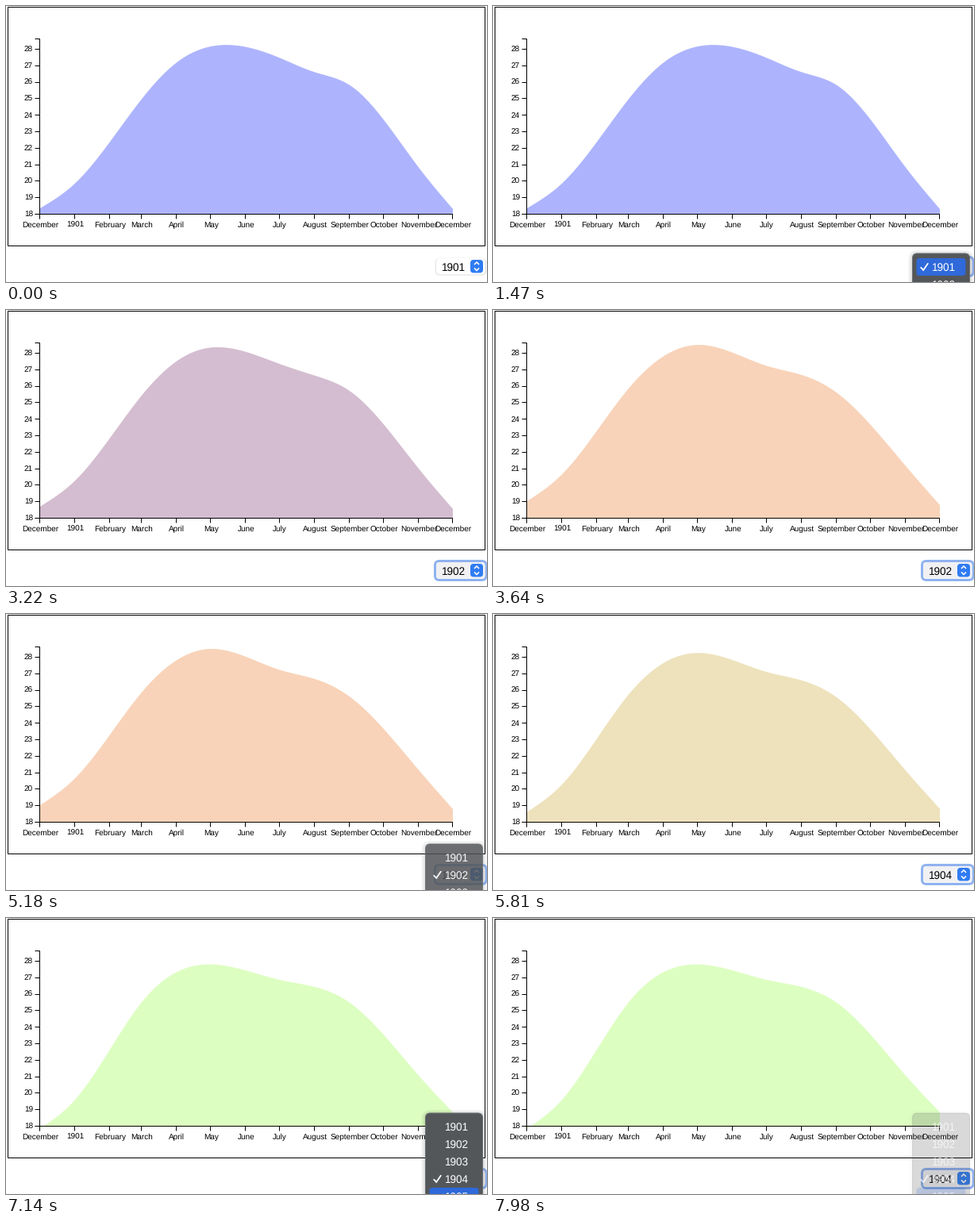
A matplotlib script for the animation above (8 s loop, 606x348 px).

```python
import numpy as np
import matplotlib.pyplot as plt
from matplotlib.animation import FuncAnimation
from matplotlib.colors import to_rgb
from matplotlib.patches import FancyBboxPatch

W, H, DPI = 606, 348, 100
LOOP, STEP = 8000, 20
PX = 72 / DPI  # points per pixel

plt.rcParams["font.family"] = "Liberation Sans"
plt.rcParams["text.hinting"] = "none"
fig = plt.figure(figsize=(W / DPI, H / DPI), dpi=DPI, facecolor="white")
ax = fig.add_axes([0, 0, 1, 1])
ax.set_xlim(0, W)
ax.set_ylim(H, 0)
ax.axis("off")


def line(xs, ys, color="black", width=1, z=3, cap="butt"):
    return ax.plot(xs, ys, color=color, lw=width * PX, zorder=z, snap=False,
                   solid_capstyle=cap, solid_joinstyle="miter")[0]


def label(x, y, text, size, color="black", ha="center", z=4):
    """Text whose digits are centred on y."""
    return ax.text(x, y + 0.36 * size, text, fontsize=size * PX, color=color,
                   ha=ha, va="baseline", zorder=z)


def rounded(x, y, w, h, r, face, edge="none", width=1, z=5, alpha=None):
    style = f"round,pad=0,rounding_size={r}"
    box = FancyBboxPatch((x, y), w, h, boxstyle=style, facecolor=face,
                         edgecolor=edge, lw=width * PX, zorder=z, alpha=alpha)
    return ax.add_patch(box)


def ease(u):
    u = min(max(u, 0), 1)
    return 4 * u**3 if u < 0.5 else 1 - 4 * (1 - u)**3


# ---- chart ----
LEFT, RIGHT, TOP, BASE, DEGREE = 43, 563, 42, 262, 20.8
MONTHS = ("December 1901 February March April May June July August "
          "September October November December").split()
lengths = [28 if m == 2 else 30 + (m + m // 8) % 2 for m in range(1, 13)]
days = np.cumsum([0, 31] + lengths[:11])
TICKS = LEFT + (RIGHT - LEFT) * days / days[-1]
XS = np.linspace(LEFT, RIGHT, 261)
# the spline fills in February, June and October
KNOTS = np.delete(TICKS, [2, 6, 10])


def spline(heights):
    """Natural cubic spline through a few key heights."""
    x, y = KNOTS, np.array(heights, float)
    h, n = np.diff(x), len(x)
    slope = np.diff(y) / h
    a, b = np.eye(n), np.zeros(n)
    for i in range(1, n - 1):
        a[i, i - 1:i + 2] = h[i - 1], 2 * (h[i - 1] + h[i]), h[i]
        b[i] = 6 * (slope[i] - slope[i - 1])
    m = np.linalg.solve(a, b)
    k = np.clip(np.searchsorted(x, XS, side="right") - 1, 0, n - 2)
    p, q, s = XS - x[k], x[k + 1] - XS, h[k]
    return ((m[k] * q**3 + m[k + 1] * p**3) / (6 * s)
            + (y[k] / s - m[k] * s / 6) * q
            + (y[k + 1] / s - m[k + 1] * s / 6) * p)


YEARS = ["1901", "1902", "1904"]
CURVES = [
    spline([255, 223.5, 117, 71, 51, 65.5, 83.5, 100, 204, 256]),
    spline([241, 207, 98.5, 58, 44, 70.5, 82, 104.5, 197, 246]),
    spline([265.5, 229, 106, 68, 58.5, 78, 87, 107, 199, 245]),
]
FILL_AT = [0, 0.5, 1, 2]
FILLS = np.array([to_rgb(c) for c in ("#adb4fd", "#d3bcd1", "#f8d3b9", "#ddfec1")])
MORPH = 1000

area = ax.fill(np.r_[XS, RIGHT, LEFT], np.r_[CURVES[0], BASE, BASE],
               color=FILLS[0], lw=0, zorder=1)[0]

line([2.5, 603.5, 603.5, 2.5, 2.5], [1.5, 1.5, 302.5, 302.5, 1.5], cap="projecting")
X0, X1, Y0, Y1 = LEFT - 0.5, RIGHT - 0.5, TOP - 0.5, BASE + 0.5
line([X0 - 6, X0, X0, X0 - 6], [Y0, Y0, Y1, Y1])
line([X0, X0, X1, X1], [Y1 + 6, Y1, Y1, Y1 + 6])
for value in range(18, 29):
    y = BASE - DEGREE * (value - 18)
    line([X0 - 6, X0], [round(y) + 0.5] * 2)
    label(LEFT - 9, y, str(value), 10, ha="right")
for x, month in zip(TICKS, MONTHS):
    line([round(x) - 0.5] * 2, [Y1, Y1 + 6])
    label(x, 275, month, 10)

# ---- select box ----
ROW_Y, ROW_H, YEAR_SIZE = 329, 22, 13.5
halo = [rounded(541.5 - g, 318.5 - g, 63 + 2 * g, 20.5 + 2 * g, 5 + g, "black",
                alpha=0.05) for g in (0.5, 1)]
ring = rounded(540.5, 316.5, 64.5, 24, 5.5, "white", "#8fb2f0", 3, z=5.1)
field = rounded(542, 318, 61.5, 20.5, 4.5, "white", z=5.2)
picked = label(549, ROW_Y, YEARS[0], YEAR_SIZE, ha="left", z=6)
rounded(585, 320, 16, 16.5, 4, "#2f7cf2", z=6)
for y, d in ((326, -3), (330.5, 3)):
    line([590, 593, 596], [y, y + d, y], "white", 1.6, z=6.1)

# ---- popup menu ----
# current row, chosen row, then times: opens, pointer moves, closed
MENUS = [(0, 1, 1400, 1820, 2715), (1, 3, 4130, 4340, 5355), (3, 4, 6580, 7000, 8020)]
FADE, PICK, BLINK, HOVER = 210, 390, 140, 210
ITEMS = 6
MX, MW, MH = 528.5, 72, ITEMS * ROW_H + 12
GROW = (1, 3, 5)
shadows = [rounded(MX, 0, MW, MH, 6 + g, "black", z=7) for g in GROW]
panel = rounded(MX, 0, MW, MH, 6, "#54575a", "#6b6e71", z=8)
lit = rounded(533.5, 0, 62, ROW_H, 4, "#2f69da", z=9)
items = [label(553, 0, str(1901 + i), YEAR_SIZE, "white", "left", z=10)
         for i in range(ITEMS)]
check = line([539.2, 542.2, 547.8], [ROW_Y + 0.8, ROW_Y + 4, ROW_Y - 4.2],
             "white", 1.8, z=10, cap="round")
POPUP = shadows + [panel, lit, check] + items


def draw_menu(t):
    now = [m for m in MENUS if m[2] <= t < m[4]]
    for art in POPUP:
        art.set_visible(bool(now))
    if not now:
        return
    row, goal, _, move, closed = now[0]
    alpha = min(1, (closed - t) / FADE)
    top = ROW_Y - 17 - ROW_H * row
    for art in [panel, lit]:
        art.set_alpha(alpha)
    for art in items + [check]:
        art.set_alpha(alpha ** 0.2)
    for g, s in zip(GROW, shadows):
        s.set_bounds(MX - g, top - g + 1, MW + 2 * g, MH + 2 * g)
        s.set_alpha(0.05 * alpha)
    panel.set_bounds(MX, top, MW, MH)
    for i, item in enumerate(items):
        item.set_y(ROW_Y + 0.36 * YEAR_SIZE + ROW_H * (i - row))
    # the pointer steps down to the chosen row, which blinks once when clicked
    hover = row if t < move else min(goal, row + 1 + (t - move) // HOVER)
    lit.set_y(ROW_Y + ROW_H * (hover - row - 0.5))
    lit.set_visible(not 0 <= t - (closed - PICK) < BLINK)


def draw(frame):
    t = frame * STEP
    closes = [m[4] for m in MENUS]
    stage = sum(ease((t - c) / MORPH) for c in closes)
    i = min(int(stage), len(CURVES) - 2)
    ys = CURVES[i] + (stage - i) * (CURVES[i + 1] - CURVES[i])
    area.set_xy(np.c_[np.r_[XS, RIGHT, LEFT], np.r_[ys, BASE, BASE]])
    area.set_color([np.interp(stage, FILL_AT, channel) for channel in FILLS.T])
    picked.set_text(YEARS[sum(t >= c for c in closes)])
    focused = t >= MENUS[0][2]
    ring.set_visible(focused)
    field.set_facecolor("#f1f1f3" if focused else "white")
    for h in halo:
        h.set_visible(not focused)
    draw_menu(t)
    return []


anim = FuncAnimation(fig, draw, frames=LOOP // STEP, interval=STEP,
                     init_func=lambda: draw(0), repeat=True, blit=False)
plt.show()
```
